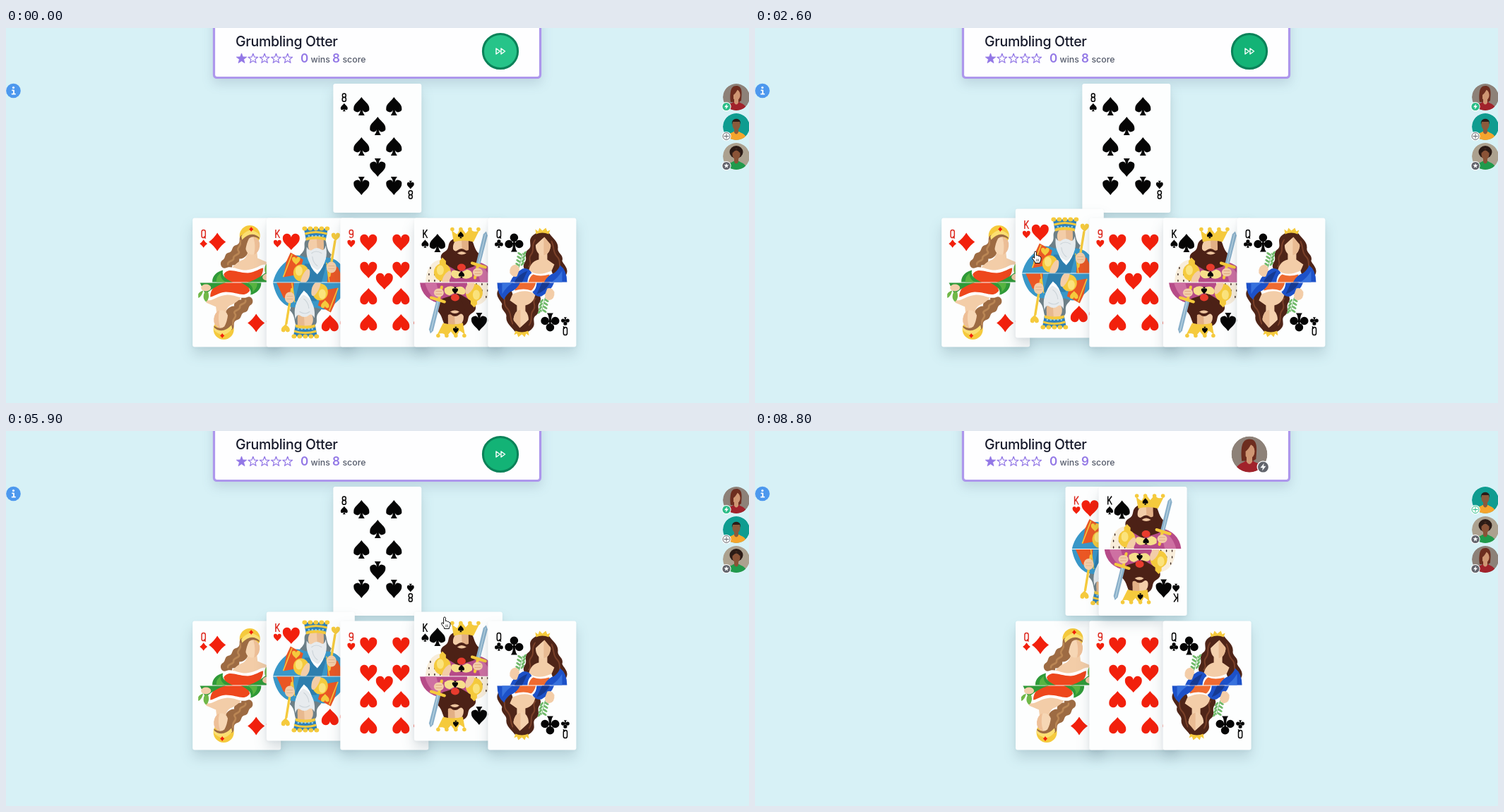
Recreate the animation shown at these times as an HTML page. Size 1052 px wide and 532 px high, loop 8.9 s.

```html
<!DOCTYPE html>
<html lang="en">
<head>
<meta charset="utf-8">
<title>Card game</title>
<style>
  html, body { margin: 0; width: 100%; height: 100%; overflow: hidden; background: #d7f1f6; }
  svg { display: block; width: 1052px; height: 532px; }
  text { font-family: Inter, Roboto, sans-serif; }
  .card { filter: drop-shadow(0 11px 9px rgba(40, 70, 90, .16)) drop-shadow(0 1px 2px rgba(40, 70, 90, .06)); }
  .panel { filter: drop-shadow(0 7px 8px rgba(40, 60, 100, .15)); }
  .index { fill: none; stroke-width: 1.5; }
</style>
</head>
<body>
<svg id="stage" viewBox="0 0 1052 532"></svg>
<script>
const LOOP = 8900, STEP = 100;
const LIFT_HEARTS = 1800, LIFT_SPADES = 3500, PLAY = 6400;
const RED = '#f2200c', BLACK = '#050505', SKIN = '#f3cda8';
const GOLD = '#f5ca3d', PURPLE = '#9277e6';

// Small SVG helpers
const at = (x, y, body, more = '') => `<g transform="translate(${x} ${y}) ${more}">${body}</g>`;
const path = (d, fill, more = '') => `<path d="${d}" fill="${fill}" ${more}/>`;
const oval = (x, y, rx, ry, fill, more = '') =>
  `<ellipse cx="${x}" cy="${y}" rx="${rx}" ry="${ry}" fill="${fill}" ${more}/>`;
const line = (d, color, width) =>
  path(d, 'none', `stroke="${color}" stroke-width="${width}" stroke-linecap="round" stroke-linejoin="round"`);
const disc = (x, y, r) => `M${x - r} ${y}a${r} ${r} 0 1 1 ${2 * r} 0a${r} ${r} 0 1 1 ${-2 * r} 0Z`;

const SUITS = {
  heart: 'M0 11.5C-4 6-12 2-12-5A6 6 0 0 1 0-6.5A6 6 0 0 1 12-5C12 2 4 6 0 11.5Z',
  spade: 'M0-13C3-8 11-3.5 11 2.5a5 5 0 0 1-9.6 2.6Q1.5 9.5 4.5 13H-4.5Q-1.5 9.5-1.4 5.1A5 5 0 0 1-11 2.5C-11-3.5-3-8 0-13Z',
  diamond: 'M0-13Q5-5 12 0Q5 5 0 13Q-5 5-12 0Q-5-5 0-13Z',
  club: disc(0, -7.2, 5.8) + disc(-7.3, 2, 5.8) + disc(7.3, 2, 5.8) +
    'M-1.3-3H1.3Q1 9.5 4.5 13H-4.5Q-1 9.5-1.3-3ZM-4 .5H4V2.5H-4Z'
};
const GLYPHS = {
  K: 'M-2.4-6V6M3-6L-2.2 1.2M-.7-1L3.2 6',
  Q: 'M-2.6-3a2.6 2.6 0 0 1 5.2 0V3a2.6 2.6 0 0 1-5.2 0ZM.6 3.5L3 6.6',
  8: 'M-2.4-3.2a2.4 2.4 0 0 1 4.8 0v.8a2.4 2.4 0 0 1-4.8 0ZM-2.6 2.4a2.6 2.6 0 0 1 5.2 0v.8a2.6 2.6 0 0 1-5.2 0Z',
  9: 'M2.6-3a2.6 2.6 0 0 0-5.2 0v1.2a2.6 2.6 0 0 0 5.2 0ZV3a2.6 2.6 0 0 1-5 .8'
};

const isRed = suit => suit === 'heart' || suit === 'diamond';
const pip = (suit, x, y, size = 1, flip = false) =>
  at(x, y, path(SUITS[suit], isRed(suit) ? RED : BLACK), `scale(${size}) rotate(${flip ? 180 : 0})`);
const index = (rank, suit) =>
  at(15.5, 22.5, `<path class="index" d="${GLYPHS[rank]}" stroke="${isRed(suit) ? '#dd2a20' : BLACK}"/>`) +
  pip(suit, 15.5, 36.5, .45);
const twice = body => body + `<g transform="rotate(180 62.5 91.5)">${body}</g>`;
const court = (rank, suit, x, y, art) =>
  twice(index(rank, suit) + pip(suit, x, y) + `<g clip-path="url(#half)">${art}</g>`);
const leaves = (x, y, color) => at(x, y,
  line('M0 12L5-8', color, 1) +
  [0, 1, 2, 3].map(i => oval(-2 + i, 8 - 5 * i, 3.6, 1.4, color, `transform="rotate(35 ${-2 + i} ${8 - 5 * i})"`) +
    oval(5 + i, 7 - 5 * i, 3.6, 1.4, color, `transform="rotate(-50 ${5 + i} ${7 - 5 * i})"`)).join(''));

const queenDiamonds =
  oval(81, 25, 14.5, 14.5, GOLD) +
  path('M70 24C63 28 70 34 63 38C54 40 58 47 52 49C44 50 48 57 42 60C37 64 41 73 47 71C51 77 57 72 56 67C64 68 67 62 66 58C75 58 80 50 80 42Z', '#9d6b43') +
  line('M68 32C70 40 61 42 65 47S57 52 58 57S49 60 50 66', '#ba8654', 2.6) +
  path('M78 46Q78 55 72 59C64 62 56 68 50 80L96 82C102 74 104 68 106 63L92 57L91 48Z', SKIN) +
  oval(84, 39, 10, 13, '#f6d6b4') + path('M86 27Q96 29 95 40Q94 49 87 52Q90 40 86 27Z', '#eebf97') +
  path('M69 37C68 24 76 20 84 20Q94 20 95 30Q86 24 80 29Q76 36 75 46Z', '#9d6b43') +
  path('M69 26Q81 10 95 24L95 28Q83 17 70 31Z', '#fbdf72') +
  pip('diamond', 83, 16, .26) +
  path('M40 78C50 62 60 74 76 74C90 73 95 66 103 66L108 92H34Z', '#fff') +
  path('M44 80C51 69 62 78 78 78C90 77 95 71 100 71C100 83 92 90 78 92H48Z', '#ee471d') +
  path('M28 92C27 83 34 76 43 74C41 82 46 86 58 92Z', '#2f9a38') +
  path('M34 92Q32 84 40 78Q38 86 48 92Z', '#58b441') +
  path('M74 92C90 89 100 80 107 75L115 92Z', '#2f9a38') +
  oval(106, 84, 7, 5, SKIN) + path('M103 78Q100 69 106 64Q112 69 108 78ZM110 80Q112 70 119 69Q118 78 110 80Z', '#70b848');

const kingHearts =
  path('M57 30C50 36 58 42 50 50C42 57 50 64 55 70L84 70C94 64 88 58 92 52C84 45 86 36 83 30Z', '#6d7f87') +
  path('M9 92C13 76 20 68 30 60C38 50 48 53 55 56H84C101 56 112 70 116 92Z', '#3997c8') +
  path('M28 62L34 49L52 59L46 80L24 84Z', '#ea5724') + path('M86 92L88 63L101 70L111 92Z', '#ea5724') +
  line('M36 52L24 83M85 64L89 91', GOLD, 1.6) + path('M54 65H85L78 92H56Z', '#2e7eae') +
  path('M60 59Q62 72 72 80Q81 70 84 57Z', '#fff') +
  oval(70, 39, 11, 13, SKIN) + path('M71 28H81V45L72 47Z', '#e8b98f') +
  path('M57 41Q61 48 65 45Q71 40 78 45Q82 47 84 39C87 54 84 65 73 74C62 70 55 57 57 41Z', '#e7ebee') +
  line('M64 50Q70 45 78 50M65 55Q66 64 72 68', '#ccd4d9', 1.2) +
  path('M53 15L87 15L84 31Q70 27 56 31Z', '#2d80ba') +
  path('M54 21Q70 16 86 21V24Q70 19 55 24ZM56 28Q70 23 84 28V32Q70 28 56 32Z', GOLD) +
  [54, 62, 70, 78, 86].map(x => oval(x, 15, 3.4, 3, GOLD)).join('') +
  [60, 65, 70, 75, 80].map(x => oval(x, 25.5, 1.3, 1.3, '#8fd0ee')).join('') +
  oval(49, 78, 11, 12, GOLD) + oval(46, 75, 5, 7, '#fbe37c') + at(42, 61, path(SUITS.heart, GOLD), 'scale(.48)') +
  path('M48 91Q50 80 57 73Q63 70 61 82Q60 88 55 92Z', SKIN) +
  line('M97 33L89 82', GOLD, 3.4) + at(98, 27, path(SUITS.heart, GOLD), 'scale(.5)') +
  oval(92, 70, 7, 8, SKIN) + line('M88 68H96M88 72H96', '#e4b68d', 1);

const kingSpades =
  path('M16 92Q17 70 29 62Q42 55 52 62L58 92Z', '#f8edda') +
  [0, 1, 2, 3, 4, 5, 6, 7, 8].map(i => oval(21 + i % 3 * 8 + (i > 5 ? 2 : 0), 89 - (i / 3 | 0) * 9, .8, 1.8, '#3b2923')).join('') +
  path('M50 92L48 65Q60 55 85 61Q114 66 117 92Z', '#b64b88') +
  path('M87 66Q104 69 110 92H94Z', '#ce70a2') +
  path('M55 30C45 36 52 43 43 48C34 53 38 62 45 66L62 76L84 69C94 64 89 57 92 51C84 44 86 36 80 30Z', '#4c2116') +
  oval(66, 42, 11, 13, SKIN) + path('M67 29H77V46L68 48Z', '#e3b086') +
  path('M54 42Q57 49 61 46Q67 41 73 46Q78 48 81 38C85 54 81 65 68 74C58 70 51 56 54 42Z', '#4c2116') +
  path('M61 50Q67 45 74 50Q67 54 61 50Z', '#edc39d') +
  path('M56 34L53 17Q58 22 61 23L66 13L73 22L80 14Q82 22 92 18L84 34Q70 30 56 34Z', GOLD) +
  [54, 66, 79, 91].map(x => oval(x, 16, 2.8, 2.8, GOLD)).join('') + pip('spade', 66, 24, .36) +
  path('M52 80Q52 72 61 75L67 77L75 73Q84 75 82 83Q74 89 67 84Q56 89 52 80Z', '#f6df8a') +
  oval(67, 70, 6, 5, '#e83b2d') + pip('spade', 67, 80, .38) +
  oval(40, 77, 12, 12.5, GOLD) + oval(37, 74, 5, 7, '#fbe37c') + path('M36 61L40 56L45 61V66H36Z', GOLD) +
  path('M39 92Q40 81 49 75Q54 74 52 84L48 92Z', SKIN) +
  path('M98 23L102 19L104 25L93 68L87 67Z', '#8ab0ca') + line('M101 23L91 66', '#b9d4e2', 1.2) +
  line('M82 64L101 70M90 68L86 85', GOLD, 4) + oval(90, 77, 7, 6, SKIN) +
  line('M86 75H94M86 79H94', '#dfaa80', 1);

const queenClubs =
  path('M66 23C54 31 64 38 58 44C49 50 57 57 52 63C46 73 58 80 65 77L92 90C103 92 109 87 111 80C115 72 107 66 105 61C108 52 98 50 99 43C100 34 92 29 87 22Q75 15 66 23Z', '#4f2518') +
  line('M67 31C60 39 67 45 61 52S64 63 58 69M90 33C95 43 91 48 98 55S98 67 105 75', '#7a4029', 2) +
  path('M72 46L72 59C63 61 57 68 57 83L86 84Q92 71 94 66L84 59L84 47Z', SKIN) +
  oval(78, 39, 10.5, 14.5, '#f4d1ae') + path('M79 25Q89 28 89 40Q87 51 79 53Z', '#e9bb93') +
  path('M66 40Q66 25 77 23Q89 23 90 39Q84 32 80 27Q74 32 66 40Z', '#4f2518') +
  path('M68 23L67 16L71 19L73 14L77 18L82 14L84 19L88 17L86 23Q77 19 68 23Z', GOLD) +
  path('M51 92Q55 78 61 76Q72 83 90 75L96 92Z', '#fff') +
  path('M57 92Q59 83 64 80Q74 84 87 80L86 92Z', '#ee6a30') +
  path('M31 92Q35 80 49 72Q57 70 62 78Q56 82 56 92Z', '#1d51c8') + path('M37 92Q42 80 56 75L48 92Z', '#163a93') +
  path('M79 92Q84 81 94 78Q101 72 102 67Q112 74 112 92Z', '#1d51c8') + path('M88 92Q98 87 105 75L105 92Z', '#3771dd') +
  leaves(44, 58, '#70b96a') + path('M31 78Q30 67 39 66Q46 69 44 75L41 83Q35 85 31 78Z', SKIN);

const pips = (suit, list) => list.map(([x, y, flip]) => pip(suit, x, y, 1, flip)).join('');
const FACES = {
  eight: twice(index(8, 'spade')) + pips('spade', [[40, 35], [86, 35], [63, 63], [40, 92], [86, 92],
    [63, 122, 1], [40, 148, 1], [86, 148, 1]]),
  qd: court('Q', 'diamond', 35, 34, queenDiamonds),
  kh: court('K', 'heart', 35, 34, kingHearts),
  nine: twice(index(9, 'heart')) + pips('heart', [[40, 35], [86, 35], [40, 74], [86, 74], [62.5, 90],
    [40, 111, 1], [86, 111, 1], [40, 148, 1], [86, 148, 1]]),
  ks: court('K', 'spade', 33, 35.5, kingSpades),
  qc: court('Q', 'club', 37, 35, queenClubs)
};
const card = id => `<g class="card" id="${id}"><rect width="125" height="183" rx="3" fill="#fdfefe"/>` +
  `<g class="face" clip-path="url(#edge)"><g>${FACES[id]}</g></g></g>`;

const star = (r, fill, edge = 0) => {
  const pts = Array.from({ length: 10 }, (_, i) => {
    const a = i * Math.PI / 5, k = i % 2 ? r * .42 : r;
    return (k * Math.sin(a)).toFixed(2) + ',' + (-k * Math.cos(a)).toFixed(2);
  });
  return `<polygon points="${pts.join(' ')}" fill="${fill}" stroke="${PURPLE}" stroke-width="${edge}" stroke-linejoin="round"/>`;
};

const person = (bg, top, skin, hair) => oval(0, 0, 19, 19, bg) + hair +
  path('M-15 20C-15 10-6 9-4 7H4C6 9 15 10 15 20Z', top) +
  path('M-3 2H3V8Q0 13-3 8Z', skin) + oval(0, -3, 5.6, 7.5, skin);
const PEOPLE = {
  bob: person('#8d8178', '#a1222b', '#cf9673', path('M-8 7C-9-5-9-16 0-16S8-6 7 5L4 7H-4Z', '#6d2d1f')) +
    path('M-8 7C-9-8-7-16 1-15Q7-13 6-4Q5-9 2-11Q-1-5-4-3L-4 5Z', '#6d2d1f'),
  short: person('#0f9c90', '#f5a52d', '#8b5b3c', '') + path('M-6-3C-8-14 8-14 6-3L5-7H-5Z', '#2a1d19'),
  curls: person('#aca18f', '#209a4c', '#8a5337', oval(0, -6, 9.5, 9, '#2b1b16')) + path('M-5-5Q0-12 5-5L5-10H-5Z', '#2b1b16')
};
const BADGES = {
  bolt: c => oval(0, 0, 5.6, 5.6, c) + path('M1-4L-3 .8H-.4L-1 4L3-1H.4Z', '#fff'),
  star: c => oval(0, 0, 5.6, 5.6, c) + star(3.7, '#fff'),
  cross: c => oval(0, 0, 5, 5, '#fff', `stroke="${c}"`) + line('M0-3V3M-3 0H3', c, 1)
};
const avatar = (x, y, who, badge, color, size = 1, bx = -14) => at(x, y,
  `<g clip-path="url(#round)">${PEOPLE[who]}</g>` +
  at(bx, 13.5, oval(0, 0, 6.6, 6.6, '#fff') + BADGES[badge](color)), `scale(${size})`);

const GREY = '#62646c', GREEN = '#2bbd88';
const HAND = 'M-1.4 1.4a1.4 1.4 0 0 1 2.8 0V5.6Q3.6 4.9 4 6.4Q5.8 5.8 6.2 7.3Q8 7 8 9V11Q8 13 6.4 15V16.5H-.5V15Q-3 12-4.4 9.6Q-4.6 7.6-2.8 8L-1.4 9.6Z';
const ARROW = 'M0 0V12.5L2.9 9.8L4.8 14L6.8 13.1L4.9 9H8.8Z';

document.getElementById('stage').innerHTML = `
  <defs>
    <clipPath id="half"><rect x="8" y="0" width="109" height="91"/></clipPath>
    <clipPath id="edge"><rect width="125" height="183" rx="3"/></clipPath>
    <clipPath id="round"><circle r="19"/></clipPath>
  </defs>
  <rect width="1052" height="532" fill="#d7f1f6"/>
  <rect class="panel" x="294.5" y="-20" width="462" height="90.5" rx="4" fill="#fefeff" stroke="#ad97ec" stroke-width="3.2"/>
  <text x="325" y="26" font-size="19.5" font-weight="500" letter-spacing="-.3" fill="#171a2b">Grumbling Otter</text>
  ${[0, 1, 2, 3, 4].map(i => at(333.5 + 16.3 * i, 43.5, i ? star(7.2, '#fff', 1.2) : star(7.6, PURPLE, .8))).join('')}
  <g font-size="12.3" font-weight="500" fill="#565c6c">
    <text x="417" y="49" font-size="17" font-weight="600" fill="${PURPLE}">0</text><text x="431.5" y="49">wins</text>
    <text id="score" x="462" y="49" font-size="17" font-weight="600" fill="${PURPLE}">8</text><text x="476.5" y="49">score</text>
  </g>
  ${oval(10.5, 89, 10.3, 10.3, '#4d98ee')}${oval(10.5, 84.5, 1.6, 1.6, '#fff')}${line('M9 88.3H11V93.5M8.6 93.7H13', '#fff', 1.8)}
  <g id="before">
    <circle id="go" cx="700" cy="33" r="24.6" stroke="#0b8259" stroke-width="3"/>
    ${line('M694 29V37L699.5 33ZM701 29V37L706.5 33Z', '#fff', 1.4)}
    ${avatar(1034, 98, 'bob', 'bolt', GREEN)}${avatar(1034, 140, 'short', 'cross', GREY)}${avatar(1034, 182, 'curls', 'star', GREY)}
  </g>
  <g id="after">
    ${avatar(700, 33, 'bob', 'bolt', GREY, 1.34, 14.5)}
    ${avatar(1034, 98, 'short', 'cross', GREEN)}${avatar(1034, 140, 'curls', 'star', GREY)}${avatar(1034, 182, 'bob', 'bolt', GREY)}
  </g>
  ${Object.keys(FACES).map(card).join('')}
  <g id="pointer">
    <g id="hand">${path(HAND, '#fff', 'stroke="#111" stroke-width="1"')}${line('M2 11V14M4.2 11V14', '#111', .7)}</g>
    ${path(ARROW, '#111', 'id="arrow" stroke="#fff" stroke-width=".8"')}
  </g>`;

const el = id => document.getElementById(id);
const show = (id, on) => { el(id).style.display = on ? '' : 'none'; };
const mix = (a, b, p) => a + (b - a) * p;
const ease = p => p * p * (3 - 2 * p);
const ramp = (t, start, span) => ease(Math.min(1, Math.max(0, (t - start) / span)));

// Rows are [time, value, ...]; the curve rests at plateaus and flows through other points.
function track(rows, t) {
  const last = rows.length - 1;
  const n = Math.min(last, Math.max(1, rows.findIndex(r => r[0] > t) < 0 ? last : rows.findIndex(r => r[0] > t)));
  const a = rows[n - 1], b = rows[n], span = b[0] - a[0];
  const p = Math.min(1, Math.max(0, (t - a[0]) / span));
  const slope = (i, k) => (rows[i + 1][k] - rows[i][k]) / (rows[i + 1][0] - rows[i][0]);
  const tangent = (i, k) => {
    if (i === 0 || i === last) return 0;
    const u = slope(i - 1, k), v = slope(i, k);
    return u * v > 0 ? 2 * u * v / (u + v) : 0;
  };
  return a.slice(1).map((v, i) => mix(v, b[i + 1], ease(p)) +
    span * p * (1 - p) * ((1 - p) * tangent(n - 1, i + 1) - p * tangent(n, i + 1)));
}
const MOUSE = [[700, 620, 545], [1100, 501, 411], [1600, 397, 317], [2700, 397, 317], [3300, 624, 315],
  [5500, 624, 315], [5900, 621, 264], [6300, 700, 36], [6600, 700, 36], [7200, 790.5, 169], [7900, 960, 545]];
const GLOW = [[0, 1], [900, 0], [2700, 0], [3800, 1], [4800, 0], [6500, 0]];

function place(id, x, y, lift = 0) {
  el(id).setAttribute('transform', `translate(${x} ${y})`);
  el(id).querySelector('.face > g').setAttribute('transform', `translate(0 ${-3 * lift})`);
}

function draw(t) {
  const done = t >= PLAY, top = 79, row = 269.5;
  const p = ramp(t, PLAY, 300);
  show('before', !done);
  show('after', done);
  show('eight', !done);
  el('score').textContent = done ? 9 : 8;
  const [g] = track(GLOW, t);
  el('go').setAttribute('fill', `rgb(${19 + 19 * g},${179 + 17 * g},${118 + 19 * g})`);

  const raised = start => row - 13 * ramp(t, start, 200);
  place('eight', 463.3, top, 1);
  place('qd', mix(264.2, 369, p), row);
  place('kh', mix(368.8, 439.5, p), mix(raised(LIFT_HEARTS), top, p), p);
  place('nine', 473.3, row);
  place('ks', mix(577.9, 486.6, p), mix(raised(LIFT_SPADES), top, p), p);
  place('qc', mix(682.4, 577.6, p), row);

  const [x, y] = track(MOUSE, t);
  const onCards = x > 264 && x < 807 && y > 256 && y < 453;
  const onButton = Math.hypot(x - 700, y - 33) < 26;
  const link = !done && (onCards || onButton);
  show('hand', link);
  show('arrow', !link);
  el('pointer').setAttribute('transform', `translate(${x} ${y})`);
}

const begin = performance.now();
let last = -1;
function tick() {
  const t = Math.floor(((performance.now() - begin) % LOOP) / STEP) * STEP;
  if (t !== last) draw(last = t);
  requestAnimationFrame(tick);
}
tick();
</script>
</body>
</html>
```
